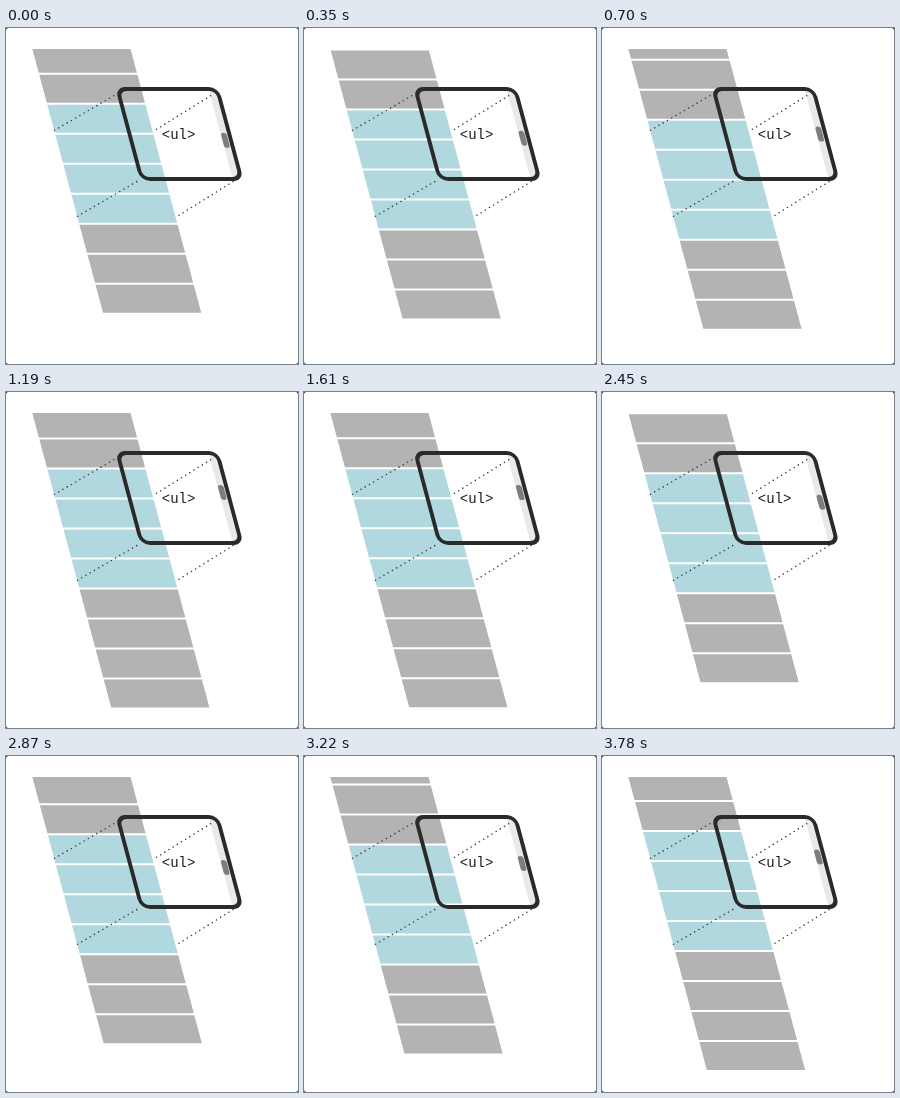
These frames come from a looping animation (292x336 px, 3.85 s). An HTML page:

```html
<!DOCTYPE html>
<html lang="en">
<head>
<meta charset="utf-8">
<title>Virtual list</title>
<style>
  html, body { margin: 0; width: 100%; height: 100%; overflow: hidden; background: #222; }
  svg { display: block; width: 292px; height: 336px; background: #fff; border-radius: 2.5px; }
  .row { fill: #b3b3b3; }
  .row.live { fill: #b2d8df; }
  .frame { fill: none; stroke: #2a2a2a; stroke-width: 4; }
  .track { fill: #e9e9e9; }
  .thumb { fill: #7d7d7d; }
  .rays { fill: none; stroke: #3a3a3a; stroke-width: 1.6; stroke-linecap: round; stroke-dasharray: 0 4.9; }
  text { font: 14px "Courier New", "Liberation Mono", monospace; fill: #1c1c1c; }
</style>
</head>
<body>
<svg viewBox="0 0 292 336">
  <defs>
    <clipPath id="view"><rect x="0" y="21" width="292" height="315"/></clipPath>
  </defs>
  <g transform="skewX(15)">
    <g id="rows" clip-path="url(#view)"></g>
    <rect class="track" x="186.2" y="62" width="8" height="88"/>
    <rect class="frame" x="95.1" y="61" width="99.8" height="90" rx="8"/>
    <rect class="thumb" id="thumb" x="186.4" y="-7.5" width="5.8" height="15" rx="2.9"/>
  </g>
  <path class="rays" d="M48.5 102.3L112.5 65M150.5 101.3L207.5 66M71.5 188.3L133.5 152M173 187.3L228 153"/>
  <text x="155.8" y="111">&lt;ul&gt;</text>
</svg>
<script>
  const LOOP = 3850, STEP = 70;
  const PITCH = 30, FIRST = -1, LAST = 8;
  const LOW = -1.5, SPAN = 39, TURN = 80, HALF = 1316.5;

  const list = document.getElementById('rows');
  const thumb = document.getElementById('thumb');
  const rows = [];

  for (let k = FIRST; k <= LAST; k++) {
    const r = document.createElementNS('http://www.w3.org/2000/svg', 'rect');
    r.setAttribute('x', 20.7);
    r.setAttribute('y', 16 + k * PITCH);
    r.setAttribute('width', 98.2);
    r.setAttribute('height', PITCH - 2);
    list.append(r);
    rows.push({ k, r });
  }

  // Scrolls back and forth at a constant speed.
  function scrollAt(t) {
    const u = Math.abs(t - TURN) / HALF % 2;
    return LOW + SPAN * (1 - Math.abs(1 - u));
  }

  function draw(now) {
    const t = Math.floor(now % LOOP / STEP) * STEP;
    const p = scrollAt(t);
    const start = p < 25 ? 2 : 1;
    for (const { k, r } of rows) {
      r.setAttribute('transform', `translate(0 ${p})`);
      r.setAttribute('class', k >= start && k < start + 4 ? 'row live' : 'row');
    }
    thumb.setAttribute('transform', `translate(0 ${112.7 - 0.39 * p})`);
  }

  let origin;
  function tick(now) {
    origin ??= now;
    draw(now - origin);
    requestAnimationFrame(tick);
  }
  draw(0);
  requestAnimationFrame(tick);
</script>
</body>
</html>
```
